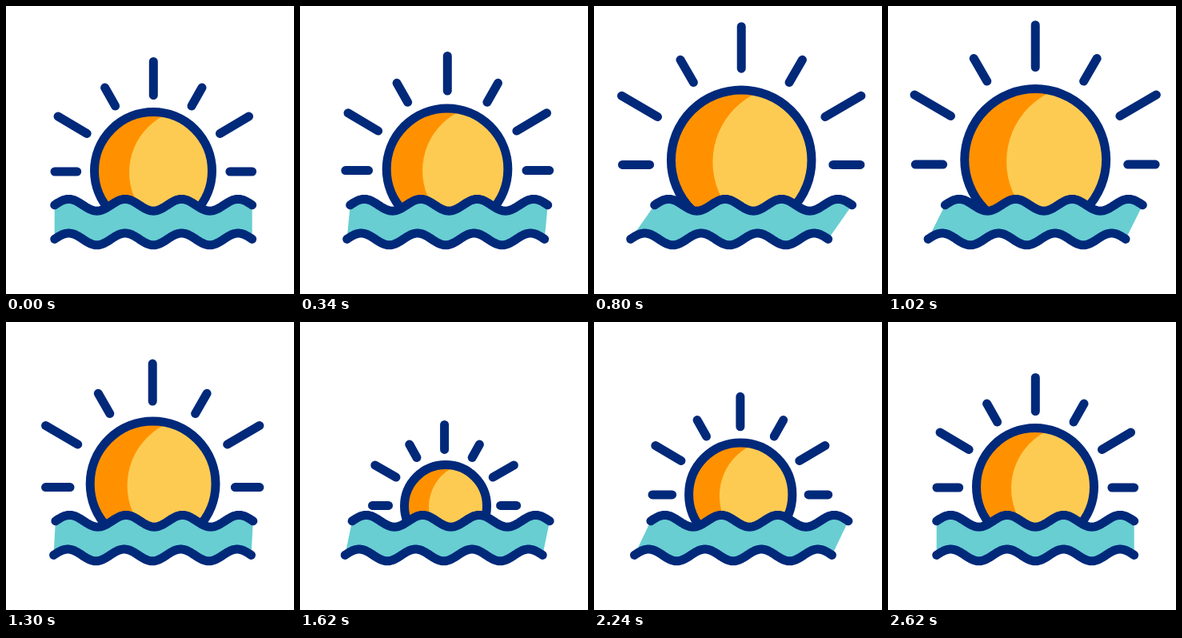
These frames come from a looping animation (360 by 360 pixels, 2820 ms). An HTML page:

```html
<!DOCTYPE html>
<html lang="en">
<head>
<meta charset="utf-8">
<title>Sunrise over water</title>
<style>
  html, body { margin: 0; width: 100%; height: 100%; overflow: hidden; background: #fff; }
  svg { display: block; width: 100vw; height: 100vh; }
  .line { fill: none; stroke: #00297a; stroke-width: 11; stroke-linecap: round; stroke-linejoin: round; }
</style>
</head>
<body>
<svg viewBox="0 0 360 360">
  <defs><clipPath id="disc"><circle id="clip"/></clipPath></defs>
  <path id="rays" class="line"/>
  <g clip-path="url(#disc)">
    <rect width="360" height="360" fill="#ff9100"/>
    <circle id="light" fill="#fecb52"/>
  </g>
  <circle id="ring" class="line"/>
  <path id="water" fill="#68ced2"/>
  <path id="waves" class="line"/>
</svg>
<script>
const LOOP = 2820, STEP = 20;
const $ = id => document.getElementById(id);
const mix = (a, b, u) => a + (b - a) * u;

// Sun: x, y, radius. Axis: mirror line of the rays.
// Rays: outer x, y, inner x, y; x is the distance from the axis.
const rest = {
  sun: [184, 206, 73.5], axis: [184.3],
  rays: [0, 69.5, 0, 111.5, 60.7, 102, 47.7, 125, 119.3, 138, 83.1, 159.5, 123.3, 207, 95.6, 207]
};
const high = {
  sun: [184.2, 192, 88.5], axis: [184.2],
  rays: [0, 23.5, 0, 76.5, 77, 65.5, 60.5, 94, 151.2, 111, 105.8, 137.5, 150, 198, 115.6, 198]
};
const low = {
  sun: [181.9, 232, 49.6], axis: [180.4],
  rays: [0, 133.8, 0, 163.7, 42.1, 157.5, 33.3, 173.3, 83.5, 182.5, 58.3, 197, 87, 231, 67.7, 231]
};

// Timing curve with control points (a, 0) and (b, 1)
function ease(x, a = 1 / 3, b = 2 / 3) {
  let lo = 0, hi = 1;
  for (let i = 0; i < 24; i++) {
    const s = (lo + hi) / 2, r = 1 - s;
    if (3 * r * r * s * a + 3 * r * s * s * b + s * s * s < x) lo = s; else hi = s;
  }
  return lo * lo * (3 - 2 * lo);
}

const span = (t, from, to) => Math.min(1, Math.max(0, (t - from) / (to - from)));

function poseAt(t) {
  let a = rest, b = high, u;
  if (t < 1100) u = ease(span(t, 200, 1100), 1 / 3, 0);
  else if (t < 1700) { a = high; b = low; u = ease(span(t, 1100, 1700)); }
  else { a = low; b = rest; u = ease(span(t, 1700, 2620)); }
  const blend = key => a[key].map((v, i) => mix(v, b[key][i], u));
  return { sun: blend('sun'), axis: blend('axis')[0], rays: blend('rays') };
}

function driftAt(t) {
  const rise = (from, to) => ease(span(t, from, to));
  return 15 * (rise(200, 810) - rise(810, 1400) + rise(1400, 2010) - rise(2010, 2620));
}

function wave(x, y) {
  const pts = [];
  for (let i = 0; i <= 140; i++) {
    const u = i / 140;
    pts.push((x + 247 * u).toFixed(2) + ' ' + (y - 7.4 * Math.sin(u * 7 * Math.PI)).toFixed(2));
  }
  return pts;
}

function setCircle(id, x, y, r) {
  const c = $(id);
  c.setAttribute('cx', x);
  c.setAttribute('cy', y);
  c.setAttribute('r', r);
}

function draw(t) {
  const { sun: [x, y, r], axis, rays } = poseAt(t);
  const k = r / 73.5;
  setCircle('clip', x, y, r);
  setCircle('ring', x, y, r);
  setCircle('light', x + 50 * k, y + 2 * k, 80 * k);

  let d = '';
  for (let i = 0; i < rays.length; i += 4) {
    const [ox, oy, ix, iy] = rays.slice(i, i + 4);
    for (const side of i ? [-1, 1] : [1])
      d += `M${axis + side * ox} ${oy}L${axis + side * ix} ${iy}`;
  }
  $('rays').setAttribute('d', d);

  const shift = driftAt(t);
  const top = wave(60.7 + shift, 248.8), bottom = wave(60.7 - shift, 291.4);
  $('waves').setAttribute('d', 'M' + top.join('L') + 'M' + bottom.join('L'));
  $('water').setAttribute('d', 'M' + top.concat(bottom.reverse()).join('L') + 'Z');
}

const start = performance.now();
function tick() {
  const t = (performance.now() - start) % LOOP;
  draw(Math.floor(t / STEP) * STEP);
  requestAnimationFrame(tick);
}
tick();
</script>
</body>
</html>
```
